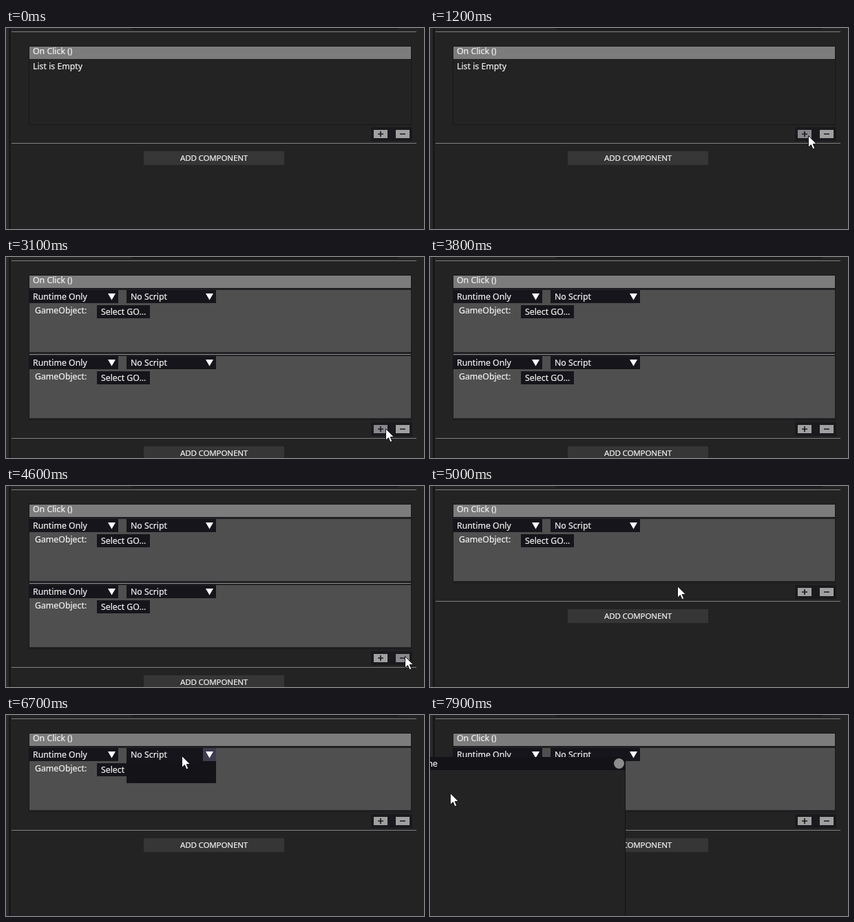
Write an HTML page that moves like this. It is 607 px wide and 292 px high and loops after 8000 ms.

```html
<!DOCTYPE html>
<html lang="en">
<head>
<meta charset="utf-8">
<title>Event list editor</title>
<style>
  html, body { margin: 0; width: 100%; height: 100%; overflow: hidden; background: #232323; }
  svg { display: block; width: 607px; height: 292px; }
  text {
    font: 500 12.3px "Noto Sans", sans-serif;
    fill: #f2f2f2; stroke: #f2f2f2; stroke-width: .2px; white-space: pre;
  }
  .caps { font-size: 11.6px; letter-spacing: -.2px; text-anchor: middle; }
  .end { text-anchor: end; }
</style>
</head>
<body>
<svg id="stage" viewBox="0 0 607 292"></svg>
<script>
const LOOP = 8000, STEP = 100, ROW = 96;
const DARK = '#15151b', MENU = '#121217', EDGE = '#17171e', RULE = '#808080', HOT = '#3d3d4f';
const BUTTON = '#a0a0a0', BUTTON_HOT = '#88888c', CHOICE = '#949497';
const stage = document.getElementById('stage');

function add(parent, tag, attrs = {}) {
  const node = document.createElementNS('http://www.w3.org/2000/svg', tag);
  for (const key in attrs) node.setAttribute(key, attrs[key]);
  parent.append(node);
  return node;
}
const group = (parent = stage) => add(parent, 'g');
const box = (parent, x, y, width, height, fill) =>
  add(parent, 'rect', { x, y, width, height, fill });
const frame = (parent, x, y, width, height) =>
  add(parent, 'rect', { x, y, width, height, fill: 'none', stroke: EDGE });
function label(parent, x, y, words, className = '') {
  add(parent, 'text', { x, y, class: className }).textContent = words;
}
const arrow = (parent, x) =>
  add(parent, 'path', { d: `M${x} 53h11l-5.5 9.5z`, fill: '#fff' });

// Each table row is [time, value]; values hold until the next row.
function play(node, property, table) {
  node.animate(
    table.map(([time, value]) => ({ offset: time / LOOP, [property]: value, easing: 'step-end' })),
    { duration: LOOP, iterations: Infinity });
}
// Switches a property on during each [from, to] span.
function during(node, property, on, off, spans) {
  const table = [[0, off]];
  for (const [from, to] of spans) {
    if (from === 0) table.pop();
    table.push([from, on]);
    if (to < LOOP) table.push([to, off]);
  }
  play(node, property, table);
}
const show = (node, ...spans) => during(node, 'visibility', 'visible', 'hidden', spans);

function combo(parent, x, width, words) {
  box(parent, x, 48, width, 19, DARK);
  label(parent, x + (x < 100 ? 5 : 6), 62, words);
  arrow(parent, x + width - 15);
}

function listItem(index, from, to) {
  const item = group();
  item.setAttribute('transform', `translate(0 ${index * ROW})`);
  box(item, 33, 45, 556, 96, '#222225');
  frame(item, 33.5, 45.5, 555, 95);
  box(item, 34, 48, 554, 90, '#4f4f4f');
  if (index) box(item, 34, 45, 554, 1, '#929292');
  combo(item, 34, 129, 'Runtime Only');
  combo(item, 175, 130, 'No Script');
  label(item, 42, 82, 'GameObject:');
  box(item, 132, 70, 77, 19, DARK);
  label(item, 138, 84, 'Select GO...');
  show(item, [from, to]);
}

// Panel
box(stage, 0, 0, 4, 292, '#29292a');
box(stage, 4, 0, 3, 292, '#18181b');
box(stage, 182, 0, 388, 2, '#17171a');
box(stage, 8, 5, 588, 1, RULE);

// Event list
frame(stage, 33.5, 26.5, 555, 114);
box(stage, 34, 27, 554, 18, '#7c7c7c');
label(stage, 39, 38, 'On Click ()');
const empty = group();
label(empty, 39, 60, 'List is Empty');
show(empty, [0, 1500]);

listItem(0, 1500, LOOP);
listItem(1, 2200, 4700);
listItem(2, 3200, 3800);

// Everything below the list moves with its height
const footer = group();
box(footer, 530, 144, 60, 20, '#1a1a1e');
const plus = box(footer, 534, 148, 20, 12, BUTTON);
const minus = box(footer, 566, 148, 20, 12, BUTTON);
add(footer, 'path', { d: 'M540 154h8M544 150v8M572 154h8', stroke: '#1b1b1f', 'stroke-width': 1.7 });
box(footer, 8, 167, 588, 1, RULE);
box(footer, 200, 179, 204, 20, '#363636');
label(footer, 302, 193, 'ADD COMPONENT', 'caps');
play(footer, 'transform', [[0, 0], [2200, 1], [3200, 2], [3800, 1], [4700, 0]]
  .map(([time, rows]) => [time, `translate(0px, ${rows * ROW}px)`]));
during(plus, 'fill', BUTTON_HOT, BUTTON, [[1200, 2200], [2900, 3200]]);
during(minus, 'fill', BUTTON_HOT, BUTTON, [[4200, 4700]]);

// Highlighted drop-down arrows
function hotArrow(x, from, to) {
  const hot = group();
  box(hot, x, 48, 19, 19, HOT);
  arrow(hot, x + 4);
  show(hot, [from, to]);
}
hotArrow(144, 5200, 5900);
hotArrow(286, 6300, 6900);

// Drop-down menus
const modes = group();
box(modes, 34, 67, 129, 33, MENU);
const upper = box(modes, 34, 68, 128, 16, MENU);
const lower = box(modes, 34, 84, 128, 16, MENU);
label(modes, 39, 79, 'Off');
label(modes, 39, 97, 'Runtime Only');
show(modes, [5400, 5900]);
during(upper, 'fill', CHOICE, MENU, [[5600, 5800]]);
during(lower, 'fill', CHOICE, MENU, [[5800, 5900]]);

const scripts = group();
box(scripts, 175, 67, 130, 32, '#131318');
show(scripts, [6700, 6900]);

// Picker window
const picker = group();
box(picker, 0, 61, 284, 231, '#232323');
box(picker, 0, 61, 284, 19, MENU);
box(picker, 283, 61, 1, 231, '#141418');
label(picker, 11, 75, 'Scene', 'end');
add(picker, 'circle', { cx: 274.5, cy: 70.5, r: 7.5, fill: '#8c8c8c' });
show(picker, [7500, LOOP]);

// Pointer: waypoints joined by straight moves, sampled every STEP
const pointer = group();
add(pointer, 'path', {
  d: 'M.5 .5V17.2L4.4 13.6 7 19.8 9.8 18.6 7.2 12.6H12.4Z',
  fill: '#fff', stroke: '#16161a', 'stroke-width': 1
});
const waypoints = [
  [0, 527, 23], [100, 527, 23], [400, 415, 63], [500, 415, 63],
  [700, 359, 92], [900, 424, 130], [1100, 532, 153], [1200, 549, 156],
  [2000, 549, 156], [2100, 550, 155], [2200, 550, 155], [2500, 551, 197],
  [2700, 551, 232], [3000, 551, 249], [3200, 551, 249], [3500, 566, 300],
  [3900, 571, 300], [4000, 571, 284], [4200, 577, 254], [4300, 579, 247],
  [4700, 579, 247], [4800, 560, 226], [5200, 158, 63], [5300, 129, 60],
  [5500, 129, 60], [5600, 129, 80], [5900, 130, 98], [6000, 150, 104],
  [6300, 243, 67], [6500, 255, 59], [6800, 255, 59], [7200, 209, 79],
  [7600, 177, 80], [7700, 177, 80], [7900, 29, 113]
];
function pointerAt(time) {
  const next = Math.max(1, waypoints.findIndex(point => point[0] >= time));
  const [t0, x0, y0] = waypoints[next - 1], [t1, x1, y1] = waypoints[next];
  const k = (time - t0) / (t1 - t0);
  return [x0 + (x1 - x0) * k, y0 + (y1 - y0) * k].map(Math.round);
}
const moves = Array.from({ length: LOOP / STEP }, (_, i) => {
  const [x, y] = pointerAt(i * STEP);
  return [i * STEP, `translate(${x}px, ${y}px)`];
});
play(pointer, 'transform', moves);
show(pointer, [100, 3500], [4000, LOOP]);
</script>
</body>
</html>
```
